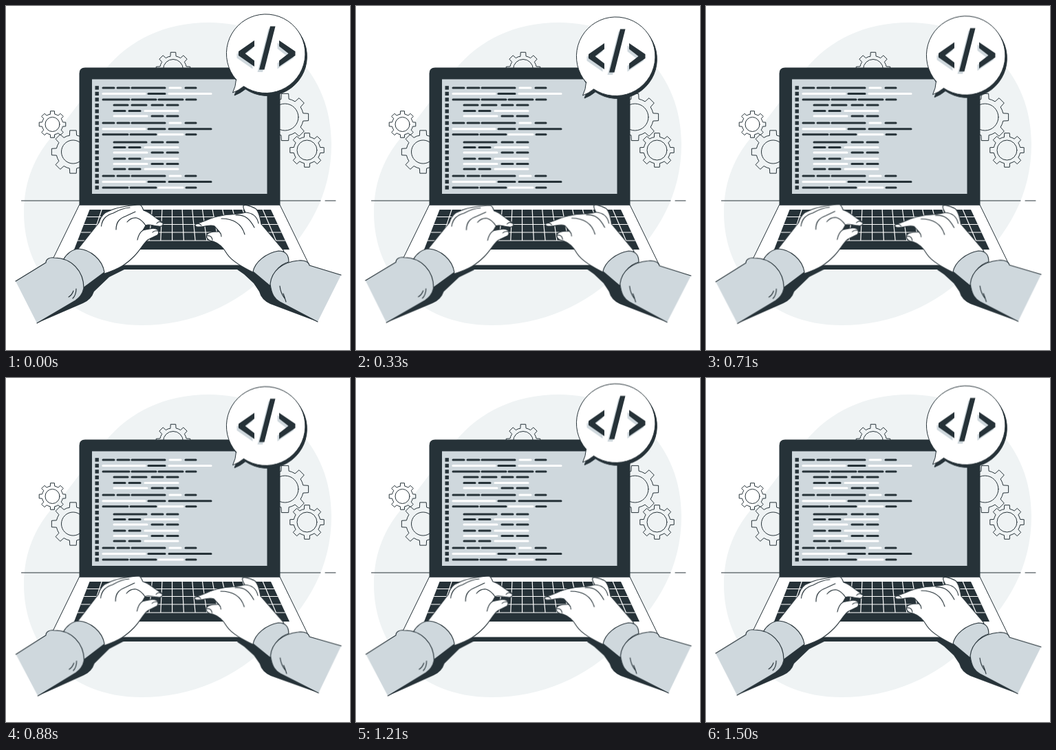
Recreate the animation shown at these times as an HTML page. Size 500 by 500 pixels, loop 1.54 s.

```html
<!DOCTYPE html>
<html lang="en">
<head>
<meta charset="utf-8">
<title>Typing code</title>
<style>
html, body { margin: 0; width: 100%; height: 100%; overflow: hidden; background: #fff; }
svg { display: block; width: 100vw; height: 100vh; }
.ink { fill: #263238; }
.tint { fill: #cfd8dd; }
.white { fill: #fff; }
.line { stroke: #263238; stroke-width: 1; stroke-linejoin: round; stroke-linecap: round; }
.none { fill: none; }
.hand { animation: sway 770ms linear -1270ms infinite alternate; }
.hand .line { stroke-width: 1.15; }
#left { transform-origin: 121px 375px; }
#right { transform-origin: 380px 375px; }
#bubble { animation: float 770ms linear -1075ms infinite alternate; }
@keyframes sway { from { transform: rotate(.7deg); } to { transform: rotate(-1.3deg); } }
@keyframes float { from { transform: translateY(5.7px); } to { transform: translateY(-3.8px); } }
</style>
</head>
<body>
<svg viewBox="0 0 500 500">
  <defs>
    <path id="balloon" d="M334.500 107A57.300 57.300 0 1 1 345.500 116.700Q338 123 329.500 126Q334 117 334.500 107Z"/>
    <g id="tag">
      <path d="M361 50V58.500L347.500 69L361 79.500V88L338 72V66Z"/>
      <path d="M384 29.500H391.500L375.500 92.500H368Z"/>
      <path d="M397 50V58.500L410.500 69L397 79.500V88L420.500 72V66Z"/>
    </g>
  </defs>

  <path fill="#eff3f4" d="M26 300C26 255 42 217 70 186C100 153 118 122 146 90C180 50 230 24 295 24C400 24 473 100 473 200C473 275 440 330 385 385C335 435 270 464 197 464C90 464 26 390 26 300Z"/>
  <g id="gears" class="line none"></g>
  <path class="line" d="M22.500 283H457M464 283H479"/>

  <path class="white line" d="M107 289H398L441 377H64Z"/>
  <rect class="ink" x="64" y="377" width="377" height="6" rx="3"/>
  <path class="ink" d="M106.500 289.500V98Q106.500 89.500 115 89.500H390Q398.500 89.500 398.500 98V289.500Z"/>
  <rect class="tint" x="125" y="106.500" width="254.500" height="166.500"/>
  <g id="code" stroke-width="3" stroke-linecap="round"></g>
  <path class="ink" d="M121.500 296H385L412 354H99Z"/>
  <path id="keys" class="none" stroke="#fff" stroke-width="1.200"/>

  <g id="left" class="hand">
    <path class="ink" d="M45 461L99 428L112 408L143 387L168 377L172 383L150 394L128 415Q124 427 112 432Z"/>
    <path class="white line" d="M104 354L135 315C138 305 143 300 150 298C160 293 178 290 194 289C198 290 198 293 200 297C210 300 216 308 227 314C230 318 227 321 222 320C214 320 208 316 203 319L199 326C207 324 217 321 221 326Q223 330 220 333C213 337 210 337 206 340C199 346 195 355 186 364C175 375 165 382 143 389Z"/>
    <path class="line none" d="M138.500 320C140 309 146 304 156 301Q168 294 180 293M160 325C160 312 167 308 175 305L188 299M176 314Q182 307 190 308Q197 310 203 319M191 340Q193 330 199 326M213 329Q215 326 221 327M219 316Q222 312 227 315"/>
    <path class="tint line" d="M83 369C88 360 97 353 106 353C122 354 140 368 143 387L112 410C112 390 100 372 83 369Z"/>
    <path class="tint line" d="M14 400L58 373C58 368 63 365 70 366C95 366 113 385 113 410C111 420 106 424 101 428L45 461"/>
    <path class="line none" d="M102 411Q102 420 97 425M98 414Q96 420 91 423"/>
  </g>

  <g id="right" class="hand">
    <path class="ink" d="M453 459L400 430L384 404L360 387L338 377L336 383L346 390L360 403L368 415Q371 427 384 433Z"/>
    <path class="white line" d="M404 356L371 317C369 305 367 297 362 294C355 291 349 288 345 290C344 294 347 297 348 300C335 304 322 302 312 305C298 307 288 314 277 316C273 318 275 322 281 321C290 321 297 317 303 320L310 328C303 328 296 328 292 332C290 336 293 341 301 342C310 345 316 351 321 360C328 371 345 380 361 388Z"/>
    <path class="line none" d="M348 300Q364 301 367 316M334 304C347 303 354 309 361 322M313 309C328 309 342 315 347 332M310 328Q313 331 313 335M292 334Q299 333 300 340M276 317Q281 315 284 319"/>
    <path class="tint line" d="M411 372C411 362 406 356 396 356C378 359 362 372 359 386L384 407C386 390 396 376 411 372Z"/>
    <path class="tint line" d="M487 391L441 377C440 372 434 369 425 370C402 372 386 385 384 404C386 420 391 426 398 430L453 459"/>
    <path class="line none" d="M398 407Q399 417 405 425M403 418Q405 423 407 430"/>
  </g>

  <g id="bubble">
    <use href="#balloon" class="ink line" x="2.500" y="4"/>
    <use href="#balloon" class="white line"/>
    <use href="#tag" class="tint" x="-2.500" y="3.500"/>
    <use href="#tag" class="ink"/>
  </g>
</svg>
<script>
const $ = id => document.getElementById(id);

function add(parent, name, attrs) {
  const el = document.createElementNS("http://www.w3.org/2000/svg", name);
  for (const key in attrs) el.setAttribute(key, attrs[key]);
  parent.append(el);
}

function gear(cx, cy, r, hole) {
  const pts = [];
  const root = r * .78;
  for (let i = 0; i < 8; i++) {
    for (const [rad, off] of [[root, -.21], [r, -.15], [r, .15], [root, .21], [root, .39]]) {
      const a = i * Math.PI / 4 - Math.PI / 2 + off;
      pts.push((cx + rad * Math.cos(a)).toFixed(2) + "," + (cy + rad * Math.sin(a)).toFixed(2));
    }
  }
  add($("gears"), "polygon", { points: pts.join(" ") });
  add($("gears"), "circle", { cx, cy, r: hole });
}
gear(67.5, 172, 19.5, 10.5);
gear(97.5, 212, 31.5, 17);
gear(243, 92, 25, 14.5);
gear(405.5, 161.5, 34.5, 19.5);
gear(437.5, 209.5, 25, 14.5);

// Each run is "start-end"; a leading w makes it white.
const rows = {
  a: "140-158 161-180 182-232 w237-255 260-277",
  b: "w140-203 206-232 w236-299",
  c: "140-180 182-219 221-258 261-277",
  d: "156-178 182-205 211-229 233-251",
  e: "156-174 178-196 w201-251",
  f: "w156-206 211-229 233-251",
  g: "w140-203 206-232 236-299",
  h: "156-205 211-229 233-251",
  i: "140-178 180-219 w221-258 261-277"
};
const heights = [119, 127.5, 136, 144, 152.5, 160, 170, 178.7, 186.7, 198, 205.5, 213, 222, 229.5, 237, 247, 255.5, 264];
[..."abcdefagihefefeagi"].forEach((kind, i) => {
  const y = heights[i];
  for (const run of rows[kind].split(" ")) {
    const [x1, x2] = run.replace("w", "").split("-").map(Number);
    const stroke = run[0] === "w" ? "#fff" : "#263238";
    add($("code"), "line", { x1: x1 + 1, x2: x2 - 1, y1: y, y2: y, stroke });
  }
  add($("code"), "rect", { x: 129.5, y: 116.2 + i * 8.53, width: 5.4, height: 5.4, fill: "#263238" });
});

// Keyboard gaps, fanned out towards the front edge.
const edge = (u, y) => {
  const k = (y - 296) / 58;
  const x0 = 121.5 - 22.5 * k, x1 = 385 + 27 * k;
  return (x0 + (x1 - x0) * u).toFixed(1) + " " + y;
};
let gaps = "";
for (const y of [306.5, 317.5, 329, 341]) gaps += `M${edge(0, y)}L${edge(1, y)}`;
for (let i = 1; i < 18; i++) {
  const u = (i + .2) / 18;
  gaps += `M${edge(u, 296)}L${edge(u, 341)}`;
}
$("keys").setAttribute("d", gaps);
</script>
</body>
</html>
```
